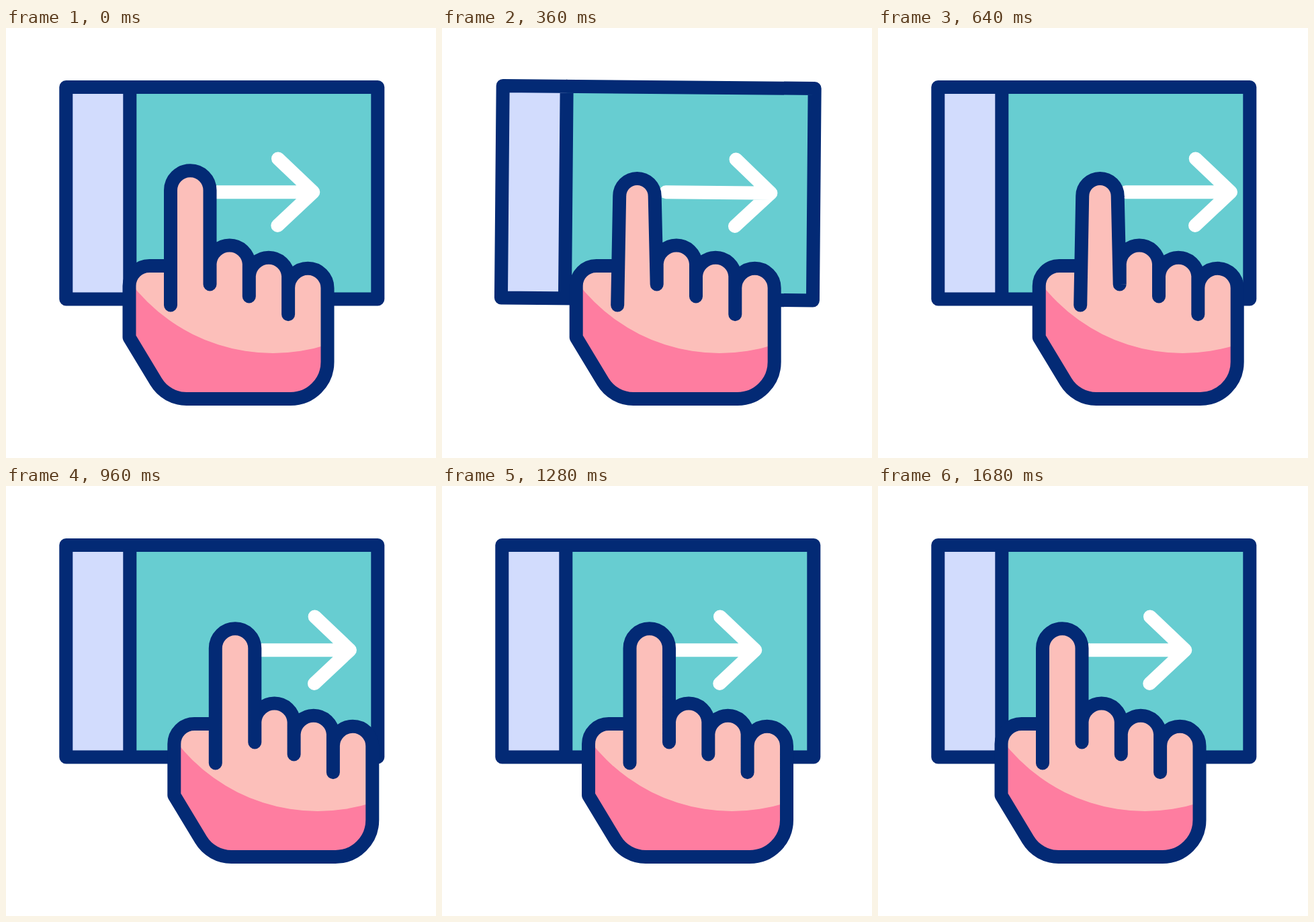
An HTML page that plays this animation: 640x640 px, repeating every 1720 ms.

```html
<!DOCTYPE html>
<html lang="en">
<head>
<meta charset="utf-8">
<title>Swipe right</title>
<style>
  html, body { margin: 0; width: 100%; height: 100%; overflow: hidden; background: #fff; }
  svg { display: block; width: 100%; height: 100%; }
  .line { fill: none; stroke: #032a75; stroke-width: 20; stroke-linecap: round; stroke-linejoin: round; }
  .arrow { stroke: #fff; }
</style>
</head>
<body>
<svg viewBox="0 0 640 640">
  <g id="screen">
    <rect x="89.3" y="88" width="464" height="315.5" fill="#67cdd1"/>
    <rect x="89.3" y="88" width="95" height="315.5" fill="#d2dcfd"/>
    <path class="line" d="M89.3 88H553.3V403.5H89.3ZM184.3 88V403.5"/>
    <path id="arrow" class="line arrow" d="M301 244.2H457.3M405 194.5L457.3 244.2L404.3 294"/>
  </g>
  <g id="hand">
    <path class="shape" fill="#fcbfba"/>
    <path fill="#fe7da0" d="M183.5 376.7A266 266 0 0 0 478.5 471.2V497A55 55 0 0 1 423.5 552H269A53 53 0 0 1 223.3 526.4L183.5 460.5Z"/>
    <path class="shape line"/>
  </g>
</svg>
<script>
const LOOP = 1720, STEP = 40;
const screenEl = document.getElementById('screen');
const arrow = document.getElementById('arrow');
const hand = document.getElementById('hand');
const shapes = document.querySelectorAll('.shape');

// Keys: [time, value]
const tracks = {
  tilt:  [[40, 0], [231, 2], [422, 0]],
  press: [[40, 0], [150, 1], [805, 1], [945, 0]],
  arrow: [[45, 0], [712, 70], [755, 70], [1432, 0]],
  hand:  [[150, 0], [805, 66.8], [955, 66.8], [1620, 0]]
};

function valueAt(keys, t) {
  if (t <= keys[0][0]) return keys[0][1];
  for (let i = 1; i < keys.length; i++) {
    const [t0, a] = keys[i - 1], [t1, b] = keys[i];
    if (t < t1) {
      const u = (t - t0) / (t1 - t0);
      return a + (b - a) * u * u * (3 - 2 * u);
    }
  }
  return keys[keys.length - 1][1];
}

// The index finger gets shorter and narrower at the tip when pressed.
function handPath(press) {
  const r = 29.25 - 3 * press;
  const y = 212.3 + 11.7 * press + r;
  const knuckle = x => `A29.2 29.2 0 0 1 ${x} `;
  return `M245 412.5L${274.25 - r} ${y}A${r} ${r} 0 0 1 ${274.25 + r} ${y}L303.5 381.5` +
    `V351${knuckle(361.8)}351V399.5` +
    `V369.2${knuckle(420.1)}369.2V426.3` +
    `V387${knuckle(478.5)}387V497` +
    'A55 55 0 0 1 423.5 552H269A53 53 0 0 1 223.3 526.4L183.5 460.5' +
    'V384A30 30 0 0 1 213.5 354H245';
}

function draw(time) {
  const t = Math.floor((time % LOOP) / STEP) * STEP;
  const v = name => valueAt(tracks[name], t);
  screenEl.setAttribute('transform', `rotate(${v('tilt')} 321.3 245.75)`);
  arrow.setAttribute('transform', `translate(${v('arrow')} 0)`);
  hand.setAttribute('transform', `translate(${v('hand')} 0)`);
  const d = handPath(v('press'));
  shapes.forEach(s => s.setAttribute('d', d));
}

let start;
function tick(now) {
  start ??= now;
  draw(now - start);
  requestAnimationFrame(tick);
}
draw(0);
requestAnimationFrame(tick);
</script>
</body>
</html>
```
